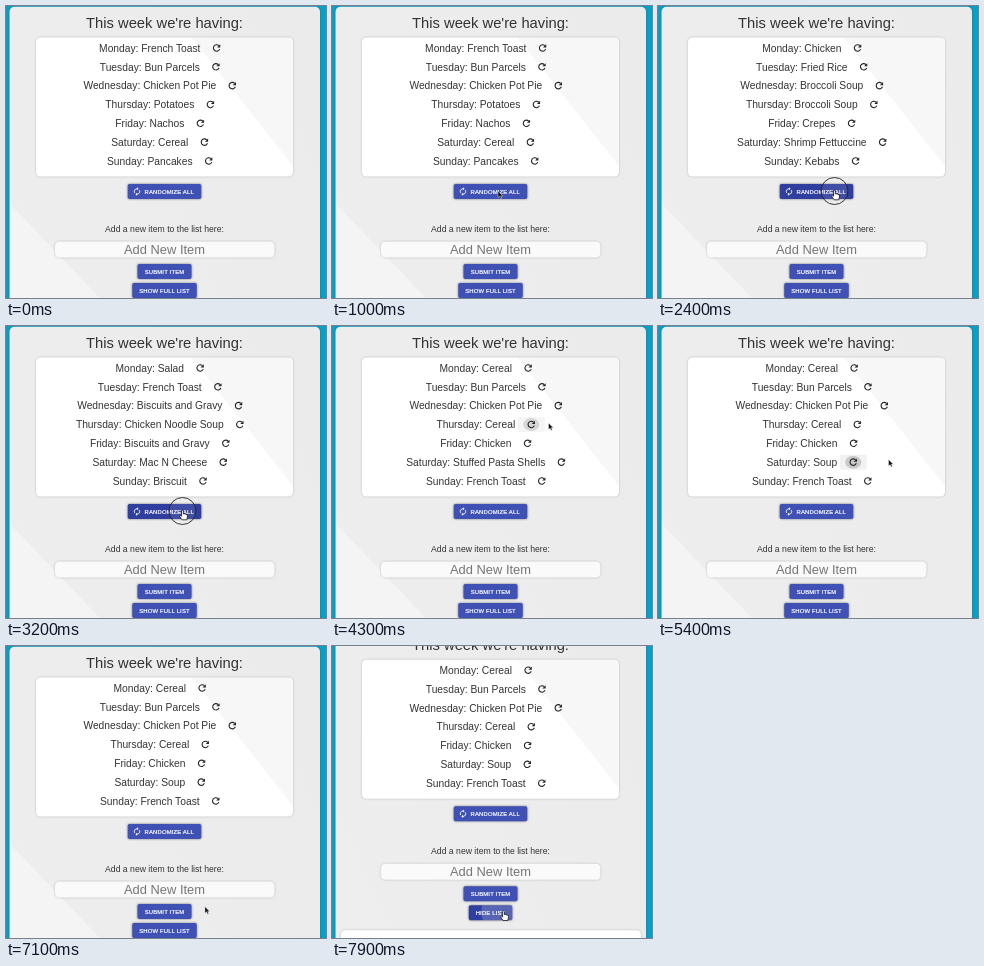
Animation, 320 px wide and 292 px high, one loop 8 s. Source, as an HTML page:

```html
<!DOCTYPE html>
<html lang="en">
<head>
<meta charset="utf-8">
<title>Weekly menu</title>
<style>
  html, body { margin: 0; width: 100%; height: 100%; overflow: hidden; background: #0a9fc4; }
  svg { display: block; width: 100vw; height: 100vh; }
  text { font-family: "Liberation Sans", Arial, sans-serif; fill: #333; text-anchor: middle; }
  .title { font-size: 14.76px; }
  .meal { font-size: 10.27px; }
  .label { font-size: 8.67px; }
  .hint { font-size: 12.9px; fill: #757575; }
  .button text { font-size: 5.9px; letter-spacing: .17px; fill: #fff; stroke: #fff; stroke-width: .22px; }
  .shadow { filter: drop-shadow(0 .6px .8px rgba(0, 0, 0, .22)); }
  .button .shadow { filter: drop-shadow(0 .7px .8px rgba(0, 0, 0, .5)); }
  .line { fill: none; stroke-width: 2.4; }
</style>
</head>
<body>
<svg id="stage" viewBox="0 0 320 292">
  <defs>
    <linearGradient id="cardFill" x1="0" y1="1" x2="1" y2="0">
      <stop offset="0" stop-color="#efefef"/><stop offset="1" stop-color="#ebebeb"/>
    </linearGradient>
    <g id="refresh">
      <path class="line" stroke="#222" d="M18.6 14.4A7 7 0 1 1 17 7"/>
      <path fill="#222" d="M20 4v7h-7z"/>
    </g>
    <g id="halfTurn">
      <path class="line" stroke="#fff" d="M6 15.5A7 7 0 0 1 12 5"/>
      <path fill="#fff" d="M12 1l4 4-4 4z"/>
    </g>
    <clipPath id="toggleClip"><rect id="toggleClipBox" y="277" height="15" rx="1.7"/></clipPath>
  </defs>
  <rect width="320" height="292" fill="#0a9fc4"/>
  <g id="page">
    <rect class="shadow" x="3.5" y=".7" width="310.5" height="700" rx="5" fill="url(#cardFill)"/>
    <path id="cardSheen" d="M4 198L94 292V310H4z" fill="#f4f4f4"/>
    <text class="title" x="158.5" y="21.5">This week we're having:</text>
    <rect class="shadow" x="30" y="31.5" width="257" height="139" rx="4.5" fill="#fff"/>
    <path d="M186 32H283Q287 32 287 36V160z" fill="#f7f7f7"/>
    <g id="rows"></g>
    <text class="label" x="158.5" y="225.6">Add a new item to the list here:</text>
    <rect class="shadow" x="49" y="235.5" width="219.5" height="16" rx="4.5" fill="#fafafa"/>
    <text class="hint" x="158.5" y="248">Add New Item</text>
    <g id="buttons"></g>
    <circle id="ripple" r="0" fill="#fff" clip-path="url(#toggleClip)"/>
    <rect id="fullList" class="shadow" x="9" y="302" width="300" height="380" rx="4.5" fill="#fff"/>
  </g>
  <circle id="ring" r="13.5" fill="#fff" fill-opacity=".08" stroke="#222" stroke-width=".9"/>
  <g id="cursor">
    <path id="arrow" d="M0 0V6.6L1.6 5.2 2.7 7.6 3.8 7.1 2.8 4.8H4.8z" fill="#111" stroke="#fff" stroke-width=".4"/>
    <path id="hand" transform="translate(0 -3)" d="M-.9 3Q0 1.4 .9 3V6Q2 5.2 2.5 6.2 3.6 5.6 3.9 6.7 5.2 6.4 5.1 8L4.3 11.8H-.4L-2.9 8.2Q-2.5 6.9 -.9 8.2z" fill="#fff" stroke="#111" stroke-width=".75"/>
    <path id="beam" d="M-1.6 -4.3Q0 -4.3 0 -3.3Q0 -4.3 1.6 -4.3M0 -3.5V3.5M-1.6 4.3Q0 4.3 0 3.3Q0 4.3 1.6 4.3" fill="none" stroke="#333" stroke-width=".8"/>
  </g>
</svg>
<script>
const LOOP = 8000, CENTER = 158.5, SCROLL = 17.8;
const TOGGLE = 7650;      // the full list opens
const HOVER_START = 1100; // the page begins to react to the pointer
const days = ['Monday', 'Tuesday', 'Wednesday', 'Thursday', 'Friday', 'Saturday', 'Sunday'];

// Each menu starts at the given time; the last two change a single day.
const third = ['Cereal', 'Bun Parcels', 'Chicken Pot Pie', 'Broccoli Soup', 'Chicken', 'Stuffed Pasta Shells', 'French Toast'];
const fourth = swap(third, 3, 'Cereal');
const menus = [
  [0, ['French Toast', 'Bun Parcels', 'Chicken Pot Pie', 'Potatoes', 'Nachos', 'Cereal', 'Pancakes']],
  [1650, ['Chicken', 'Fried Rice', 'Broccoli Soup', 'Broccoli Soup', 'Crepes', 'Shrimp Fettuccine', 'Kebabs']],
  [2500, ['Salad', 'French Toast', 'Biscuits and Gravy', 'Chicken Noodle Soup', 'Biscuits and Gravy', 'Mac N Cheese', 'Briscuit']],
  [3330, third],
  [4200, fourth],
  [5400, swap(fourth, 5, 'Soup')]
];
const track = [
  [100, 200, 304], [600, 166, 187], [800, 166, 187], [1000, 166, 185], [1200, 176.5, 185],
  [3450, 176.5, 185], [3950, 216.5, 97], [4500, 216.5, 97], [5150, 230.5, 133.5],
  [5480, 230.5, 133.5], [5800, 217, 237.5], [6300, 217, 242.5], [6500, 217, 242.5],
  [6800, 217, 245.5], [6950, 217, 245.5], [7300, 171.5, 283.5], [TOGGLE, 171.5, 283.5],
  [7800, 171.5, 283.5 - SCROLL]
];
const presses = [[1450, 1650], [2300, 2500], [3130, 3330], [4050, 4200], [5250, 5400], [7500, TOGGLE]];
const iconRipples = [[3, 4050, 4200], [5, 5250, 5400]];

const $ = id => document.getElementById(id);
const clamp = v => Math.max(0, Math.min(1, v));
const ease = v => v * v * (3 - 2 * v);
const show = (node, on) => node.setAttribute('visibility', on ? 'visible' : 'hidden');

function swap(list, index, value) {
  return list.map((item, i) => i === index ? value : item);
}

function set(node, attrs) {
  for (const key in attrs) node.setAttribute(key, attrs[key]);
}

function add(parent, tag, attrs) {
  const node = document.createElementNS('http://www.w3.org/2000/svg', tag);
  set(node, attrs);
  return parent.appendChild(node);
}

const rows = days.map((day, i) => {
  const y = 42 + 18.83 * i;
  const text = add($('rows'), 'text', { class: 'meal', x: 143.8, y: y + 3.7 });
  const box = add($('rows'), 'g', {});
  const hover = add(box, 'rect', { x: -13.5, y: -7.5, width: 27, height: 15, rx: 1.7 });
  const ripple = add(box, 'ellipse', { rx: 8, ry: 6.5 });
  add(box, 'use', { href: '#refresh', transform: 'scale(.46) translate(-12 -12)' });
  return { day, y, text, box, hover, ripple };
});

function makeButton(label, y, width, textX = CENTER) {
  const group = add($('buttons'), 'g', { class: 'button' });
  const rect = add(group, 'rect', { class: 'shadow', x: CENTER - width / 2, y, width, height: 15, rx: 1.7 });
  const text = add(group, 'text', { x: textX, y: y + 9.5 });
  text.textContent = label;
  return { group, rect, text, y, width };
}

const randomize = makeButton('RANDOMIZE ALL', 178, 73.5, 163.2);
const icon = add(randomize.group, 'g', { transform: 'translate(131 185.5) scale(.39) translate(-12 -12)' });
add(icon, 'use', { href: '#halfTurn' });
add(icon, 'use', { href: '#halfTurn', transform: 'rotate(180 12 12)' });
const submit = makeButton('SUBMIT ITEM', 258, 54);
const toggle = makeButton('SHOW FULL LIST', 277, 64.5);
const buttons = [randomize, submit, toggle];

function cursorAt(t) {
  let i = 0;
  while (i < track.length - 1 && t >= track[i + 1][0]) i++;
  const a = track[i], b = track[i + 1] || a;
  const k = b === a ? 0 : ease(clamp((t - a[0]) / (b[0] - a[0])));
  return [a[1] + (b[1] - a[1]) * k, a[2] + (b[2] - a[2]) * k];
}

function drawRows(t, x, y) {
  const meals = menus.filter(([start]) => t >= start).pop()[1];
  let over = false;
  rows.forEach((row, i) => {
    const label = `${row.day}: ${meals[i]}`;
    if (row.text.textContent !== label) row.text.textContent = label;
    const iconX = 143.8 + row.text.getComputedTextLength() / 2 + 16.1;
    row.box.setAttribute('transform', `translate(${iconX} ${row.y})`);
    const hovered = Math.abs(x - iconX) < 13.5 && Math.abs(y - row.y) < 7.5;
    over = over || hovered;
    const hit = iconRipples.find(([index, start, end]) => index === i && t >= start && t < end + 400);
    const glow = hit ? clamp((t - hit[1]) / 120) * clamp((hit[2] + 400 - t) / 400) : 0;
    row.hover.setAttribute('fill-opacity', Math.max(hovered ? .05 : 0, glow * .05));
    row.ripple.setAttribute('fill-opacity', glow * .17);
  });
  return over;
}

function drawButtons(t, x, y) {
  const open = t >= TOGGLE;
  toggle.width = open ? 43.5 : 64.5;
  toggle.text.textContent = open ? 'HIDE LIST' : 'SHOW FULL LIST';
  const box = { x: CENTER - toggle.width / 2, width: toggle.width };
  set(toggle.rect, box);
  set($('toggleClipBox'), box);
  const grow = clamp((t - 7500) / 550);
  set($('ripple'), { cx: x, cy: y, r: 4 + 25 * grow, 'fill-opacity': t >= 7500 ? .2 : 0 });
  show($('fullList'), open);
  show($('cardSheen'), !open);
  let over = false;
  for (const b of buttons) {
    const hovered = t >= HOVER_START && Math.abs(x - CENTER) < b.width / 2 && y > b.y && y < b.y + 15;
    b.rect.setAttribute('fill', hovered ? '#303f9f' : '#3f51b5');
    over = over || hovered;
  }
  return over;
}

function render(t) {
  const scroll = SCROLL * ease(clamp((t - TOGGLE) / (7800 - TOGGLE)));
  const [x, y] = cursorAt(t), pageY = y + scroll;
  $('page').setAttribute('transform', `translate(0 ${-scroll})`);
  const overRow = drawRows(t, x, pageY), overButton = drawButtons(t, x, pageY);
  const overInput = x > 49 && x < 268.5 && pageY > 235.5 && pageY < 251.5;
  const shape = overRow || overButton ? 'hand' : overInput ? 'beam' : 'arrow';
  for (const id of ['hand', 'beam', 'arrow']) show($(id), id === shape);
  $('cursor').setAttribute('transform', `translate(${x} ${y})`);
  set($('ring'), { cx: x, cy: y });
  show($('ring'), presses.some(([start, end]) => t >= start && t < end));
}

const begin = performance.now();
function frame() {
  render((performance.now() - begin) % LOOP);
  requestAnimationFrame(frame);
}
frame();
</script>
</body>
</html>
```
